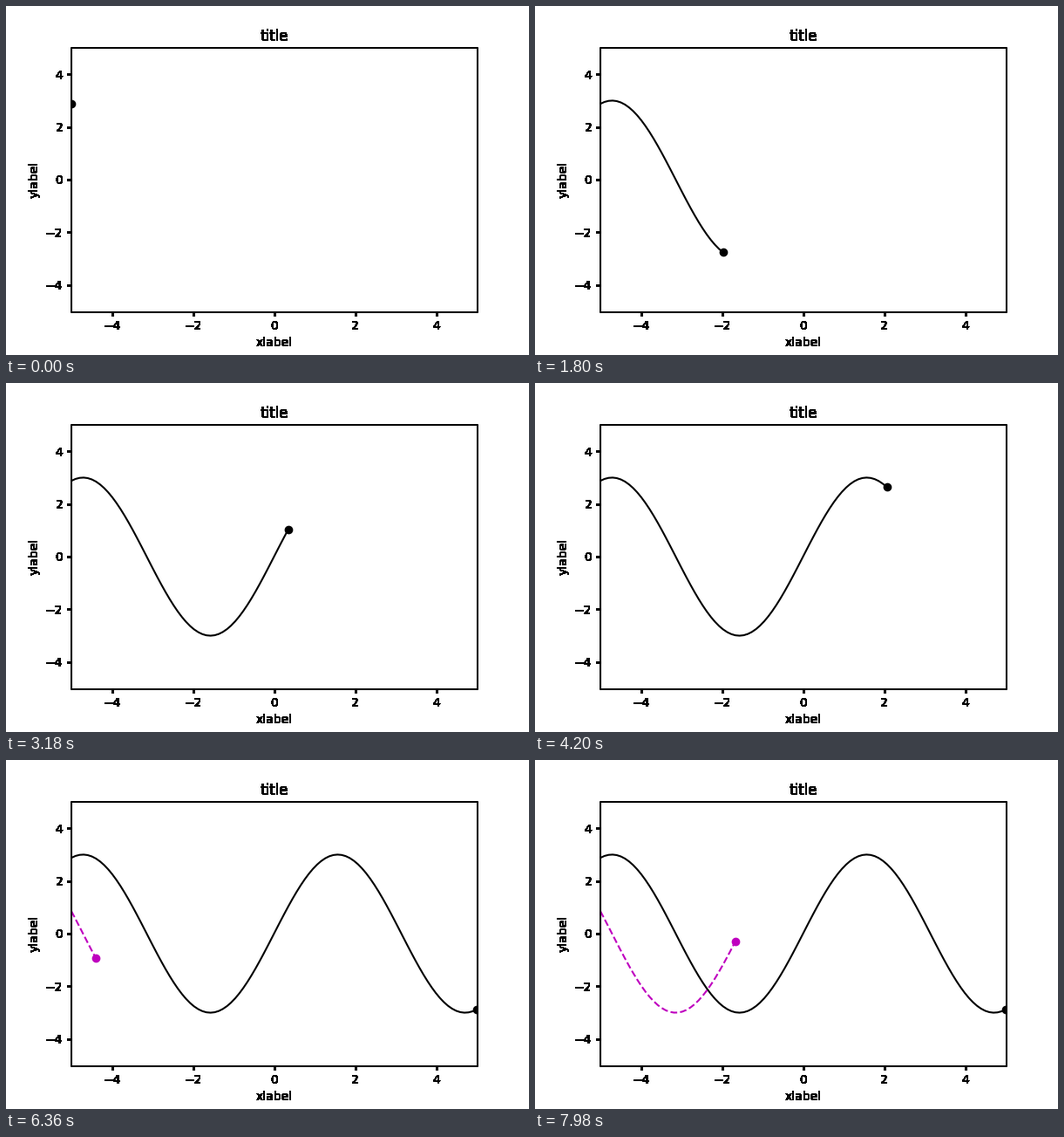
These frames come from a looping animation (600 px wide and 400 px high, 8000 ms). A matplotlib script:

```python
import numpy as np
import matplotlib.pyplot as plt
from matplotlib.animation import FuncAnimation

DPI = 100
LOOP = 8000      # ms
STEP = 60        # ms per plotted sample
TICK = 20        # ms per drawn frame
SAMPLES = 100
OVERDRAW = 200   # labels and frame are painted over themselves this often

plt.rcParams["font.family"] = "DejaVu Sans"
plt.rcParams["font.size"] = 10

fig = plt.figure(figsize=(6, 4), dpi=DPI, facecolor="white")
fig.subplots_adjust(left=0.125, right=0.9, bottom=0.125, top=0.88)
ax = fig.add_subplot()
ax.set(xlim=(-5, 5), ylim=(-5, 5), title="title", xlabel="xlabel", ylabel="ylabel")
ax.set_xticks(range(-4, 5, 2))
ax.set_yticks(range(-4, 5, 2))


def freeze_backdrop():
    """Bake the saturated labels and ticks into a still behind the curves."""
    fig.canvas.draw()
    shade = np.asarray(fig.canvas.buffer_rgba())[..., :3] / 255.0
    backdrop = shade ** OVERDRAW
    height = shade.shape[0]
    x0, y0, x1, y1 = np.rint(ax.bbox.extents).astype(int)
    backdrop[height - y1:height - y0, x0:x1] = 1.0
    fig.figimage(backdrop, zorder=-1)
    ax.patch.set_visible(False)
    ax.set_title("")
    ax.xaxis.set_visible(False)
    ax.yaxis.set_visible(False)


class Trace:
    """A curve that grows sample by sample behind a leading dot."""

    def __init__(self, func, color, style, start):
        self.x = np.linspace(-5, 5, SAMPLES)
        self.y = func(self.x)
        self.start = start
        self.line, = ax.plot([], [], style, color=color, lw=1.5)
        self.dot, = ax.plot([], [], "o", color=color, ms=6)

    def show(self, step):
        n = int(np.clip(step - self.start + 1, 0, SAMPLES))
        self.line.set_data(self.x[:n], self.y[:n])
        head = slice(max(n - 1, 0), n)
        self.dot.set_data(self.x[head], self.y[head])
        return self.line, self.dot


freeze_backdrop()
traces = [
    Trace(lambda x: 3 * np.sin(x), "k", "-", 0),
    Trace(lambda x: 3 * np.cos(x), "m", "--", SAMPLES),
]


def update(frame):
    step = frame * TICK // STEP
    return [artist for trace in traces for artist in trace.show(step)]


def init():
    return update(0)


anim = FuncAnimation(fig, update, frames=LOOP // TICK, init_func=init,
                     interval=TICK, repeat=True, repeat_delay=0, blit=False)
plt.show()
```
